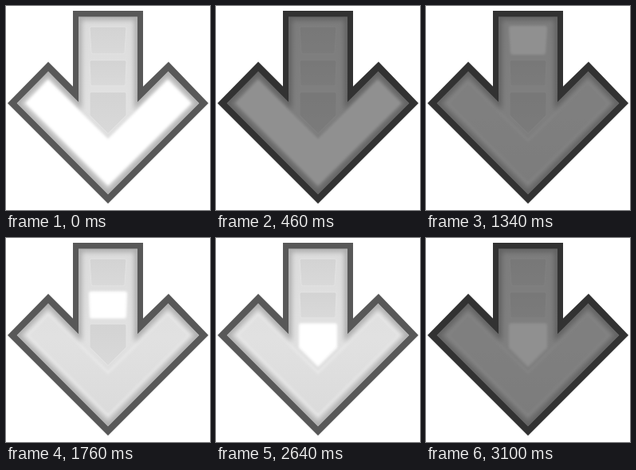
These frames come from a looping animation (256x256 px, 3.52 s). An HTML page:

```html
<!DOCTYPE html>
<html lang="en">
<head>
<meta charset="utf-8">
<title>Down arrow</title>
<style>
  html, body { margin: 0; width: 100%; height: 100%; overflow: hidden; background: #fff; }
  svg { display: block; width: 100vw; height: 100vh; }
</style>
</head>
<body>
<svg viewBox="0 0 256 256">
  <defs>
    <path id="outer" d="M84 6H172V101L204 70L254 122L128 248L2 122L53 70L84 101Z"/>
    <path id="inner" d="M91 13.5H165V120.5L203.5 82L242.5 122L128 236.5L13.5 122L53 82L91 120.5Z"/>
    <path id="chevron" d="M53 95L128 169L203 95L230 122L128 223L27 122Z"/>
    <path id="top" d="M107 26H149Q151 26 151 28L149 58Q149 60 147 60H109Q107 60 107 58L105 28Q105 26 107 26Z"/>
    <path id="mid" d="M107 68H149Q151 68 151 70L150 98Q150 100 148 100H108Q106 100 106 98L105 70Q105 68 107 68Z"/>
    <path id="tip" d="M107 108H149Q151 108 151 110V137L128 160L105 137V110Q105 108 107 108Z"/>
    <clipPath id="inside"><use href="#inner"/></clipPath>
    <filter id="soft" x="-20%" y="-20%" width="140%" height="140%"><feGaussianBlur stdDeviation="3.2"/></filter>
    <filter id="glow" x="-20%" y="-20%" width="140%" height="140%"><feGaussianBlur stdDeviation="1.5"/></filter>
    <linearGradient id="body" x1="0" y1="0" x2="0" y2="1">
      <stop offset="0" stop-color="#dcdcdc"/>
      <stop offset=".5" stop-color="#e1e1e1"/>
      <stop offset="1" stop-color="#dadada"/>
    </linearGradient>
    <linearGradient id="cell" x1="0" y1="0" x2="0" y2="1">
      <stop offset="0" stop-color="#d3d3d3"/>
      <stop offset="1" stop-color="#d9d9d9"/>
    </linearGradient>
  </defs>

  <use href="#outer" fill="#585858"/>
  <g clip-path="url(#inside)">
    <use href="#inner" fill="url(#body)"/>
    <use href="#chevron" fill="none" stroke="#e8e8e8" stroke-width="3" filter="url(#glow)"/>
    <use href="#inner" fill="none" stroke="#aaa" stroke-width="8" filter="url(#soft)"/>
    <g fill="url(#cell)" stroke="#e3e3e3" stroke-width="1">
      <use href="#top"/><use href="#mid"/><use href="#tip"/>
    </g>
    <g fill="#fff" stroke="#fff" filter="url(#glow)">
      <use class="light" href="#chevron" stroke-width="3"/>
      <use class="light" href="#top" stroke-width="2"/>
      <use class="light" href="#mid" stroke-width="2"/>
      <use class="light" href="#tip" stroke-width="2"/>
    </g>
  </g>
  <use id="shade" href="#outer" opacity="0"/>
</svg>
<script>
  const BEAT = 880, HOLD = 120, FADE = 340, STEPS = 8, DARKEST = 0.435;
  const lights = [...document.querySelectorAll('.light')];
  const shade = document.getElementById('shade');

  function draw() {
    const time = performance.now() % (BEAT * lights.length);
    const active = Math.floor(time / BEAT);
    const since = time % BEAT - HOLD;
    const step = since < 0 ? 0 : Math.min(STEPS, 1 + Math.floor(since * (STEPS - 1) / FADE));
    lights.forEach((light, i) => light.setAttribute('visibility', i === active ? 'visible' : 'hidden'));
    shade.setAttribute('opacity', DARKEST * step / STEPS);
    requestAnimationFrame(draw);
  }
  draw();
</script>
</body>
</html>
```
